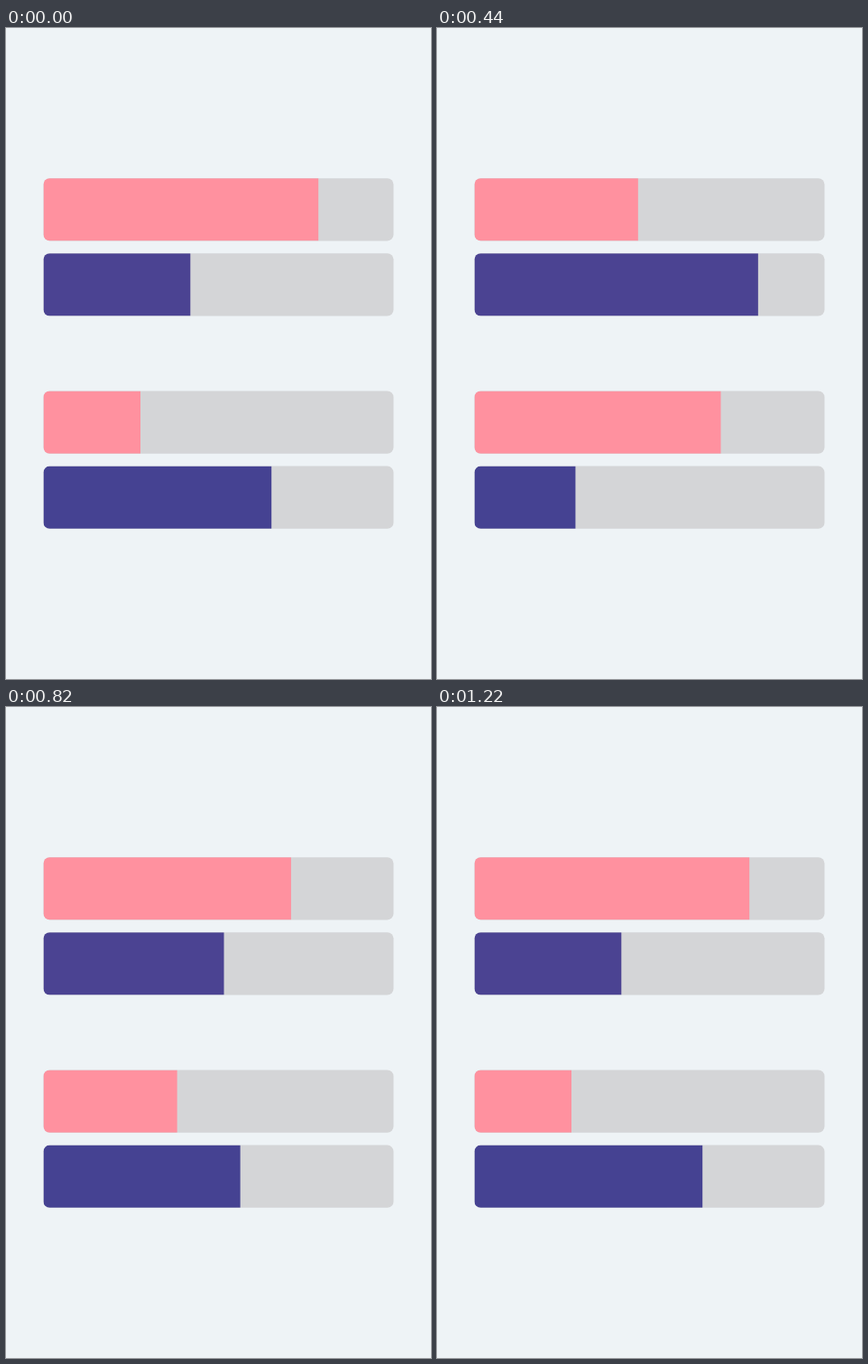
These frames come from a looping animation (471x720 px, 1300 ms). An HTML page:

```html
<!DOCTYPE html>
<html lang="en">
<head>
<meta charset="utf-8">
<title>Spring bars</title>
<style>
  html, body { margin: 0; height: 100%; overflow: hidden; background: #eef3f6; }
  svg { display: block; width: 471px; height: 720px; }
</style>
</head>
<body>
<svg viewBox="0 0 471 720"></svg>
<script>
const LOOP = 1300, STEP = 20;
const LEFT = 41.5, WIDTH = 388, HEIGHT = 69.23, RADIUS = 6.9;
const DAMPING = 0.745, FREQ = 0.0165; // FREQ in rad per ms

// top, colour, right edge in each of the two rest states
const bars = [
  { y: 166.15, color: '#ff919f', from: 346.2, to: 225 },
  { y: 249.23, color: '#4b4392', from: 204.3, to: 353.2 },
  { y: 401.54, color: '#ff919f', from: 149, to: 311.6 },
  { y: 484.62, color: '#454292', from: 294.2, to: 155.9 }
];

const svg = document.querySelector('svg');

function add(parent, tag, attrs) {
  const el = document.createElementNS('http://www.w3.org/2000/svg', tag);
  for (const key in attrs) el.setAttribute(key, attrs[key]);
  return parent.appendChild(el);
}

bars.forEach((bar, i) => {
  const box = { x: LEFT, y: bar.y, width: WIDTH, height: HEIGHT, rx: RADIUS };
  add(add(svg, 'clipPath', { id: 'clip' + i }), 'rect', box);
  add(svg, 'rect', { ...box, fill: '#d4d5d7' });
  const group = add(svg, 'g', { 'clip-path': `url(#clip${i})` });
  bar.fill = add(group, 'rect', { x: LEFT, y: bar.y, height: HEIGHT, fill: bar.color });
});

// Damped spring released from rest: 0 -> 1 with a slight overshoot
function spring(ms) {
  if (ms <= 0) return 0;
  const u = ms * FREQ, s = Math.sqrt(1 - DAMPING ** 2);
  return 1 - Math.exp(-DAMPING * u) * (Math.cos(s * u) + DAMPING / s * Math.sin(s * u));
}

function progress(t) {
  if (t < 680) return spring(Math.min(t, 600) - 79.4);
  return t < 1220 ? 1 - spring(t - 689.6) : 0;
}

function draw(now) {
  const t = Math.floor(now % LOOP / STEP) * STEP;
  const p = progress(t);
  for (const { fill, from, to } of bars) {
    fill.setAttribute('width', from + (to - from) * p - LEFT);
  }
}

let start;
function tick(now) {
  start ??= now;
  draw(now - start);
  requestAnimationFrame(tick);
}
draw(0);
requestAnimationFrame(tick);
</script>
</body>
</html>
```
